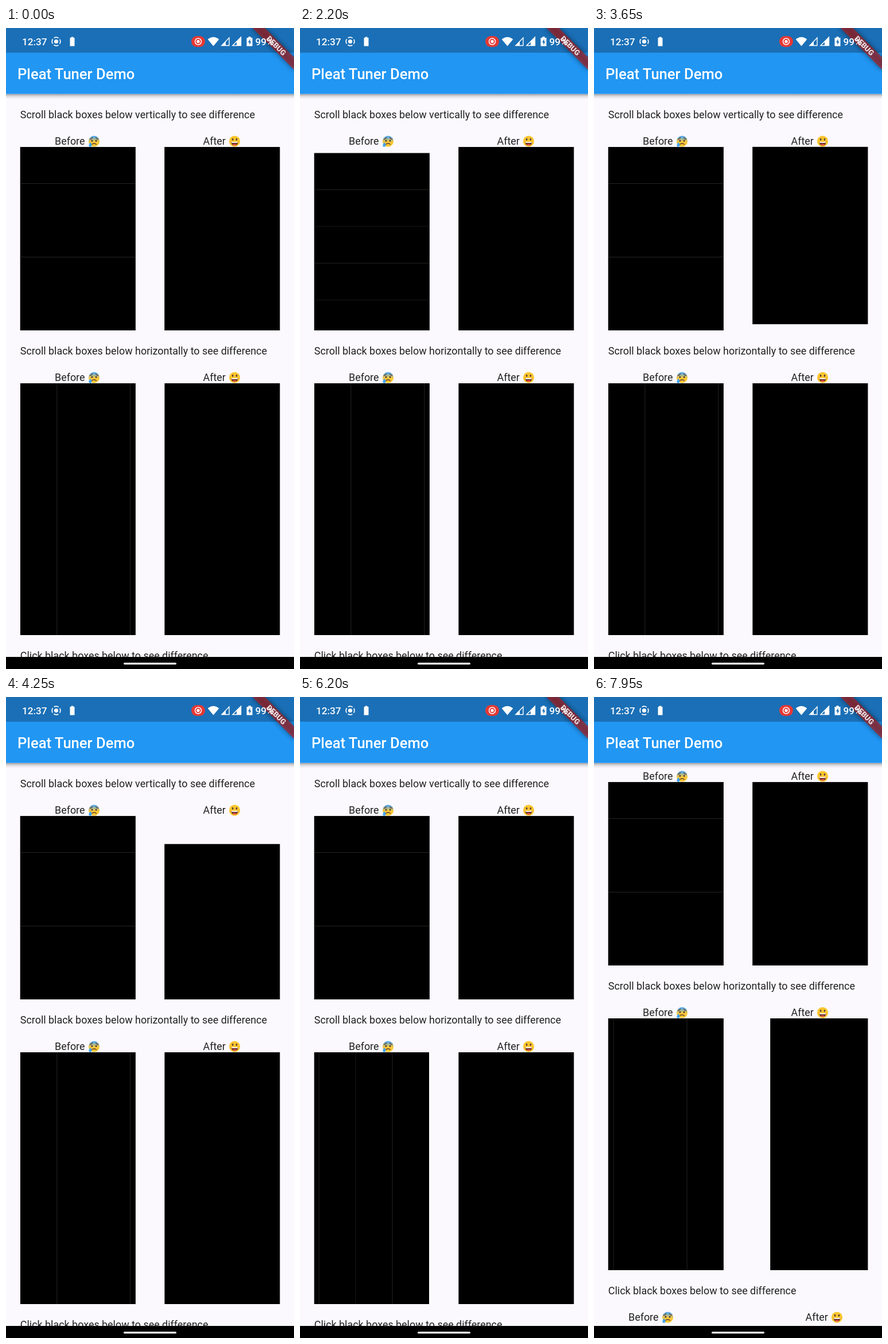
An HTML page that plays this animation: 502x1115 px, repeating every 8 s.

```html
<!DOCTYPE html>
<html lang="en">
<head>
<meta charset="utf-8">
<title>Pleat Tuner Demo</title>
<style>
html, body { margin: 0; width: 100%; height: 100%; overflow: hidden; background: #fbf9fd; }
svg { display: block; width: 502px; height: 1115px; font-family: Roboto, sans-serif; }
#page text { font-size: 17.92px; fill: #212121; }
</style>
</head>
<body>
<svg viewBox="0 0 502 1115">
  <defs>
    <linearGradient id="sky" x2="0" y2="1">
      <stop offset=".1" stop-color="#58a9e8"/><stop offset=".55" stop-color="#fcc836"/>
    </linearGradient>
    <linearGradient id="shade" x2="0" y2="1">
      <stop stop-opacity=".36"/><stop offset=".45" stop-opacity=".12"/><stop offset="1" stop-opacity="0"/>
    </linearGradient>
    <filter id="blur" x="-20%" y="-120%" width="140%" height="340%"><feGaussianBlur stdDeviation="5"/></filter>
    <clipPath id="v0"><path d="M24.700 206.800h201.200v319.200h-201.200z"/></clipPath>
    <clipPath id="v1"><path d="M276.200 206.800h201.200v319.200h-201.200z"/></clipPath>
    <clipPath id="h0"><path d="M24.700 618h201.200v438h-201.200z"/></clipPath>
    <clipPath id="h1"><path d="M276.200 618h201.200v438h-201.200z"/></clipPath>
    <g id="worried">
      <circle r="9.6" fill="url(#sky)"/>
      <path d="M-7-3.5q3-.5 4-3M7-3.5q-3-.5-4-3M-4 5.5q4-3.5 8 0" fill="none" stroke="#5d4037" stroke-width="1.3" stroke-linecap="round"/>
      <ellipse cx="-3.6" cy="-.8" rx="1.3" ry="1.8" fill="#4e342e"/>
      <ellipse cx="3.6" cy="-.8" rx="1.3" ry="1.8" fill="#4e342e"/>
      <path d="M-6.5 1.5q4 5.5 1.6 7.4a2.8 2.8 0 0 1-4-.2q-1.2-2 2.4-7.2z" fill="#42a5f5"/>
    </g>
    <g id="happy">
      <circle r="9.6" fill="#fcc630"/>
      <ellipse cx="-3.4" cy="-3.2" rx="1.4" ry="2.1" fill="#5d4037"/>
      <ellipse cx="3.4" cy="-3.2" rx="1.4" ry="2.1" fill="#5d4037"/>
      <path d="M-6 1h12q-.5 6.5-6 6.5T-6 1z" fill="#6d3426"/>
      <path d="M-5.3 1H5.3v1.8H-5.3z" fill="#fff"/>
      <ellipse cy="6" rx="3" ry="1.3" fill="#ef5350"/>
    </g>
  </defs>
  <rect width="502" height="1115" fill="#fbf9fd"/>

  <g id="page">
    <text x="24.8" y="157">Scroll black boxes below vertically to see difference</text>
    <text x="24.8" y="568">Scroll black boxes below horizontally to see difference</text>
    <text x="24.8" y="1098">Click black boxes below to see difference</text>
    <g id="labels"></g>
    <g clip-path="url(#v0)"><g id="beforeV"><path d="M24 206.800h203v319.200h-203z"/></g></g>
    <g clip-path="url(#v1)"><path id="afterV" d="M276 206.800h203v319.200h-203z"/></g>
    <g clip-path="url(#h0)"><g id="beforeH"><path d="M24.700 617h256v440h-256z"/></g></g>
    <g clip-path="url(#h1)"><path id="afterH" d="M276.200 617h256v440h-256z"/></g>
  </g>

  <rect y="114.7" width="502" height="9" fill="url(#shade)"/>
  <rect width="502" height="114.7" fill="#2196f3"/>
  <rect width="502" height="43" fill="#1a6fb6"/>
  <text x="20" y="89" font-size="25.6" font-weight="500" fill="#fff">Pleat Tuner Demo</text>

  <g transform="translate(502) rotate(45)">
    <rect x="-51.2" y="35.8" width="102.4" height="15.4" fill-opacity=".5" filter="url(#blur)"/>
    <rect x="-51.2" y="35.8" width="102.4" height="15.4" fill="#b71c1c" fill-opacity=".63"/>
    <text y="48.1" font-size="13" font-weight="900" fill="#fff" fill-opacity=".85" text-anchor="middle">DEBUG</text>
  </g>

  <g fill="#fff">
    <g font-size="17.2" font-weight="500">
      <text x="28" y="29.5">12:37</text>
      <text x="434.5" y="29.5">99%</text>
    </g>
    <circle cx="87.5" cy="23.5" r="7.3" fill="none" stroke="#fff" stroke-width="1.7" stroke-dasharray="8.5 2.97" stroke-dashoffset="4.2"/>
    <circle cx="87.5" cy="23.5" r="3.6"/>
    <path d="M113.500 15.500h4v1.500h2v14.500h-8v-14.500h2z"/>
    <rect x="323" y="14" width="24" height="19" rx="9.500" fill="#e53935"/>
    <circle cx="335" cy="23.500" r="5.500" fill="none" stroke="#fff" stroke-width="1.500"/>
    <circle cx="335" cy="23.500" r="2.700"/>
    <path d="M361.500 31.500l-9.800-11.800q9.800-8 19.600 0z"/>
    <path d="M376 30.500L389 17v13.500zM395 30.500L409.500 16v14.500z" fill="none" stroke="#fff" stroke-width="1.400"/>
    <path d="M383 23v7.500h-7zM402 23.500l8-8V31h-8z"/>
    <path d="M422.500 15h4v2h3v14.500h-10V17h3z"/>
    <path d="M425.500 19l-3.500 6h2.200v4.500l3.300-6h-2z" fill="#1a6fb6"/>
  </g>

  <rect y="1094" width="502" height="21"/>
  <rect x="205" y="1104" width="92" height="3.200" rx="1.600" fill="#fff"/>
</svg>

<script>
const get = id => document.getElementById(id);
const clamp = u => Math.min(1, Math.max(0, u));
const smooth = (t, a, b) => { const u = clamp((t - a) / (b - a)); return u * u * (3 - 2 * u); };

// Overscroll: dragged until the release, then brought back by an overdamped spring.
function pull(t, start, release, amount) {
  const s = (t - release) / 1000;
  const v = amount * (s < 0 ? smooth(t, start, release)
                            : 1.7 * Math.exp(-9.08 * s) - .7 * Math.exp(-22 * s));
  return Math.abs(v) < .3 ? 0 : v;
}
const move = (id, x, y) => get(id).setAttribute('transform', `translate(${x} ${y})`);

// Each row: left edges of the two labels and their baseline.
get('labels').innerHTML = [[85, 343.5, 203], [85, 343.5, 614], [60, 368.5, 1144]].map(([b, a, y]) =>
  `<text x="${b}" y="${y}">Before</text><use href="#worried" x="${b + 68.5}" y="${y - 6}"/>
   <text x="${a}" y="${y}">After</text><use href="#happy" x="${a + 55}" y="${y - 6}"/>`).join('');

// Seams between the tiles; the even ones only show off the pixel grid.
function seams(id, count, shape) {
  for (let k = 1; k <= count; k++)
    get(id).insertAdjacentHTML('beforeend',
      `<path d="${shape(k)}" stroke="#242424" class="${k % 2 ? 'odd' : 'even'}"/>`);
}
seams('beforeV', 4, k => `M24 ${206.5 + Math.round(63.9 * k)}h203`);
seams('beforeH', 3, k => `M${24.75 + 64 * k} 618v438`);

function showEven(id, on) {
  for (const line of get(id).querySelectorAll('.even')) line.setAttribute('opacity', on ? .7 : 0);
}

function draw(now) {
  const t = now % 8000;
  const v = pull(t, 800, 1330, -45) + pull(t, 1700, 2000, 40);
  const h = pull(t, 5400, 5750, -35);
  move('page', 0, -59 * smooth(t, 6400, 6900));
  move('beforeV', 0, v);
  move('afterV', 0, pull(t, 2250, 2563, 49) + pull(t, 3150, 3450, -40) + pull(t, 3950, 4250, 49));
  move('beforeH', -54.7 * smooth(t, 4800, 5080) + h, 0);
  move('afterH', pull(t, 7600, 7950, 31), 0);
  showEven('beforeV', v);
  showEven('beforeH', h);
  requestAnimationFrame(draw);
}
requestAnimationFrame(draw);
</script>
</body>
</html>
```
